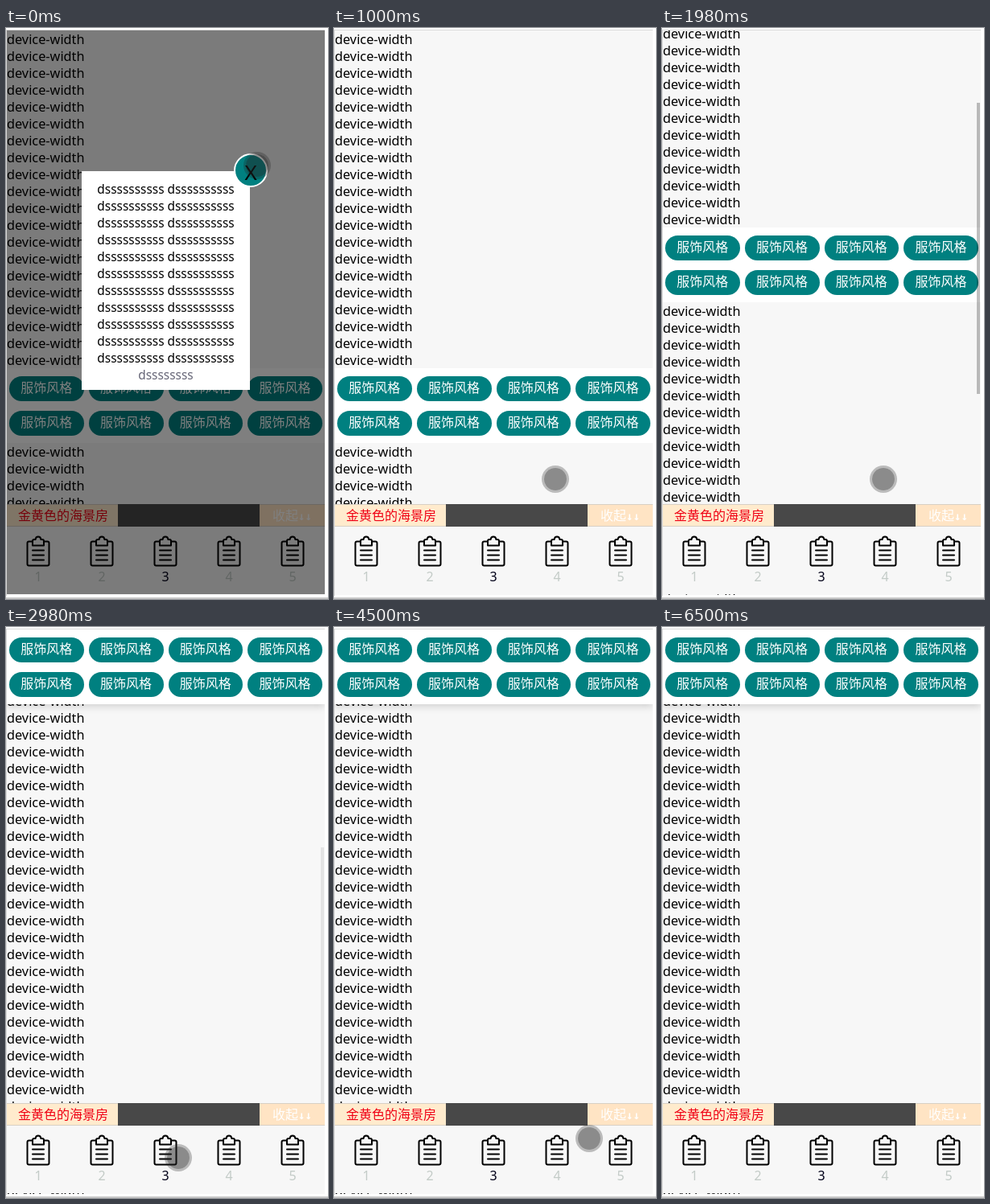
Animation of 400x710 px, one loop 6.83 s. Source, as an HTML page:

```html
<!DOCTYPE html>
<html lang="zh">
<head>
<meta charset="utf-8">
<style>
  html, body { margin: 0; width: 100%; height: 100%; overflow: hidden; background: #fff; }
  body { position: relative; font: 16px/21px "Noto Sans", "Noto Sans CJK SC", "Noto Sans CJK", sans-serif; color: #000; }
  div { box-sizing: border-box; }
  #frame { position: absolute; left: 0; top: 2px; width: 396px; height: 704px; border: solid #d9d9d9; border-width: 1px 0 0 1px; }
  #edge { position: absolute; left: 0; top: 708px; width: 400px; height: 2px; background: #c8c8c8; }
  #phone { position: absolute; left: 1px; top: 3px; width: 395px; height: 702px; overflow: hidden; background: #f7f7f7; }
  #phone > div { position: absolute; }
  #page { left: 0; top: 1px; font-size: 16.3px; white-space: pre; }
  #pills { left: 0; width: 395px; height: 93px; background: #fff; }
  .pill { position: absolute; width: 92.75px; height: 31px; border-radius: 15.5px; background: #008080; color: #fff; text-align: center; line-height: 29px; }
  #thumb { left: 390px; width: 4px; background: #000; }
  #panel { left: 0; top: 98px; width: 395px; height: 491px; padding-top: 1px; overflow: hidden; background: #f5f5dc; display: grid; grid-template-columns: repeat(3, 1fr); grid-auto-rows: 27.28px; text-align: center; line-height: 27.28px; }
  .a { letter-spacing: .75px; }
  .b { letter-spacing: -.5px; }
  #dock { left: 0; bottom: 1px; width: 395px; background: #f7f7f7; }
  #bar { display: flex; height: 28px; line-height: 27px; background: #484848; }
  #name, #fold { border: solid #d8d0c4; border-width: 1px 0; }
  #name { width: 138px; padding-left: 14px; background: #ffebcd; color: #f00014; }
  #fold { width: 81px; margin-left: auto; padding-left: 16px; background: #ffe4c4; color: #fff; }
  #fold span { font: bold 14px "DejaVu Sans Mono", monospace; }
  #tabs { position: relative; height: 84px; }
  .tab { position: absolute; top: 11px; width: 40px; text-align: center; color: #c3cbc7; }
  .tab svg { display: block; margin: 0 auto 2px; }
  .tab.on { color: #000018; }
  #shade { left: 0; top: 0; width: 395px; height: 701px; background: rgba(0, 0, 0, .5); }
  #modal { left: 93px; top: 175px; width: 209px; height: 272px; padding-top: 12px; background: #fff; text-align: center; font-size: 15.4px; }
  #modal p { margin: 0; color: #667; }
  #close { position: absolute; left: 189px; top: -22px; width: 42px; height: 42px; border: 2px solid #fff; border-radius: 50%; background: #008080; font-size: 26px; line-height: 43px; }
  #cursor { position: absolute; left: -17px; top: -17px; width: 34px; height: 34px; border: 3px solid rgba(32, 32, 32, .28); border-radius: 50%; background: rgba(32, 32, 32, .5) padding-box; }
  #cursor.down { border-width: 5px; border-color: rgba(32, 32, 32, .36); }
</style>
</head>
<body>
<div id="frame"></div>
<div id="edge"></div>
<div id="phone">
  <div id="page"><div id="upper"></div><div id="lower"></div></div>
  <div id="pills"></div>
  <div id="thumb"></div>
  <div id="panel"></div>
  <div id="dock">
    <div id="bar"><div id="name">金黄色的海景房</div><div id="fold">收起<span>↓↓</span></div></div>
    <div id="tabs"></div>
  </div>
  <div id="shade"></div>
  <div id="modal"><div id="lines"></div><p>dssssssss</p><div id="close">X</div></div>
</div>
<div id="cursor"></div>
<script>
const $ = id => document.getElementById(id);
const repeat = (n, make) => Array.from({ length: n }, (_, i) => make(i)).join('');

const ROW = 21, HEAD = 20 * ROW, PILLS = 93, VIEW = 701, LENGTH = 1267;
const row = () => 'device-width\n';
$('upper').textContent = repeat(20, row);
$('lower').textContent = repeat(40, row);
$('upper').style.height = HEAD + 'px';

$('pills').innerHTML = repeat(8, i =>
  `<div class="pill" style="left:${3 + i % 4 * 98.75}px;top:${i < 4 ? 10 : 53}px">服饰风格</div>`);
$('panel').innerHTML = repeat(54, i =>
  i < 30 ? '<div class="a">AAAAAAAA</div>' : '<div class="b">BBBBBBB</div>');
$('lines').innerHTML = repeat(11, () => 'dssssssssss dssssssssss<br>');

const icon = `<svg width="30" height="39" fill="none" stroke="#000" stroke-width="2" stroke-linejoin="round" stroke-linecap="round">
  <rect x="1.5" y="7.5" width="27" height="30" rx="2"/>
  <path d="M8 12.5V7q0-2 2-2h1.5q.5-3.5 3.5-3.5t3.5 3.5H20q2 0 2 2v5.5z" fill="#f7f7f7"/>
  <path d="M8 18.5h14M8 24.5h14M8 30.5h14"/></svg>`;
$('tabs').innerHTML = repeat(5, i =>
  `<div class="tab${i == 2 ? ' on' : ''}" style="left:${19 + i * 79}px">${icon}${i + 1}</div>`);

const LOOP = 6830;
// start ms, scroll, scrollbar opacity, cursor position, extras
const steps = [
  [0, 0, 0, [312, 171], 'modal'],
  [500, 0, 0, [312, 171], 'modal down'],
  [1000, 0, 0, [275, 561], ''],
  [1480, 101, .25, [275, 561], ''],
  [1980, 175, .25, [275, 561], ''],
  [2480, 489, .25, [275, 561], ''],
  [2980, 489, .08, [214, 660], ''],
  [3500, 489, 0, [208, 664], 'panel down'],
  [4500, 489, 0, [317, 636], ''],
  [5000, 489, 0, [361, 611], ''],
  [5500, 489, 0, [355.5, 640], 'folded'],
  [6000, 489, 0, [355.5, 693], 'folded'],
  [6500, 489, 0, null, '']
];

const show = (id, on) => $(id).style.display = on ? '' : 'none';

function draw(t) {
  const [, scroll, alpha, cursor, extras] = steps.findLast(s => s[0] <= t);
  const has = word => extras.includes(word);
  const stuck = scroll > HEAD;

  $('page').style.transform = `translateY(${-scroll}px)`;
  $('lower').style.marginTop = (stuck ? 0 : PILLS) + 'px';
  $('pills').style.top = Math.max(0, HEAD - scroll) + 'px';
  $('pills').style.boxShadow = stuck ? '0 3px 9px rgba(0,0,0,.16)' : 'none';

  const ratio = VIEW / (stuck ? LENGTH : LENGTH + PILLS);
  Object.assign($('thumb').style, { top: scroll * ratio + 'px', height: VIEW * ratio + 'px', opacity: alpha });

  show('panel', has('panel'));
  show('tabs', !has('folded'));
  show('shade', has('modal'));
  show('modal', has('modal'));
  show('cursor', cursor);
  $('cursor').className = has('down') ? 'down' : '';
  if (cursor) $('cursor').style.transform = `translate(${cursor[0]}px, ${cursor[1]}px)`;
}

const start = performance.now();
function tick() {
  draw((performance.now() - start) % LOOP);
  requestAnimationFrame(tick);
}
tick();
</script>
</body>
</html>
```
